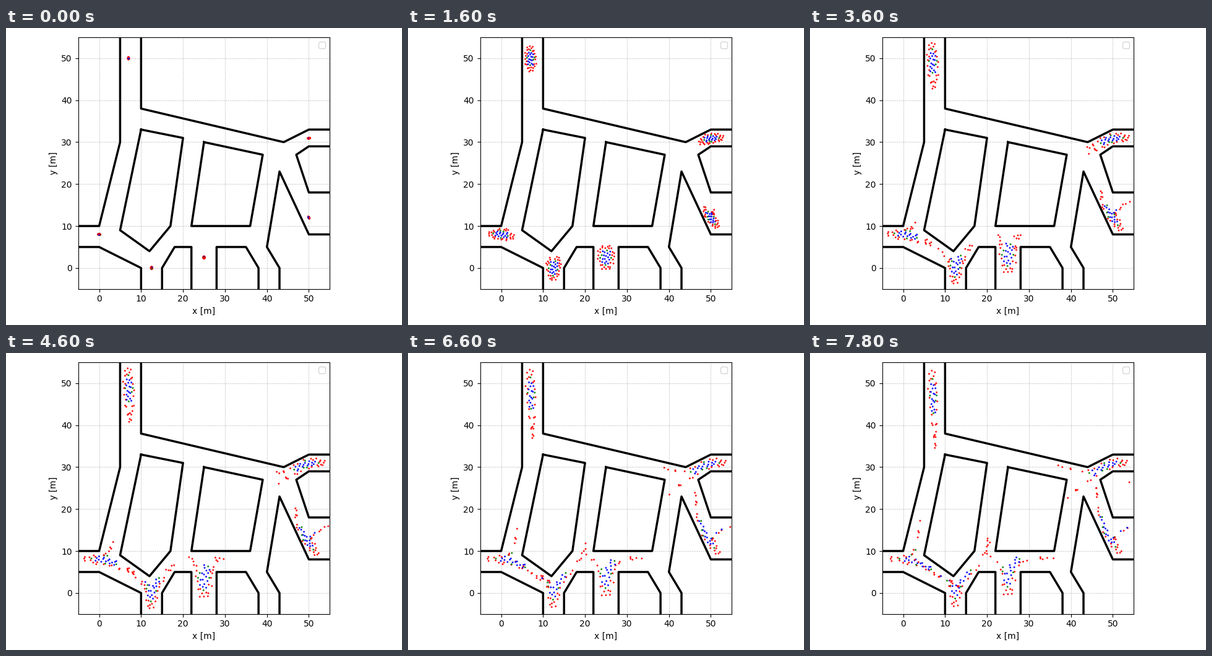
Recreate the animation shown at these times as a matplotlib script. Size 640 by 480 pixels, loop 8000 ms.

```python
import numpy as np
import matplotlib.pyplot as plt
from matplotlib.animation import FuncAnimation

W, H, DPI = 640, 480, 100
STEP_MS, STEPS = 200, 40
N, CALM = 48, 20     # people per crowd, those in its slow core
SPEED, REACH = 1.85, 3.0
RUN_UP = 7           # straight stretch behind each crowd's centre

WALLS = [
    [(5, 55), (5, 30), (0, 10), (-5, 10)],
    [(10, 55), (10, 38), (44, 30), (50, 33), (55, 33)],
    [(10, 33), (20, 31), (17, 10), (12, 4), (5, 9), (10, 33)],
    [(25, 30), (39, 27), (36, 10), (22, 10), (25, 30)],
    [(55, 29), (50, 29), (47, 27), (50, 18), (55, 18)],
    [(55, 8), (50, 8), (43, 23), (40, 5), (43, 0), (43, -5)],
    [(-5, 5), (0, 5), (10, 0), (10, -5)],
    [(15, -5), (15, 0), (18, 5), (22, 5), (22, -5)],
    [(28, -5), (28, 5), (35, 5), (38, 0), (38, -5)],
]

rng = np.random.default_rng(7)


def clearance(point):
    """Distance from a point to the nearest wall."""
    f = np.linspace(0, 1, 200)[:, None]
    return min(np.hypot(*(np.array(a) * (1 - f) + np.array(b) * f - point).T).min()
               for wall in WALLS for a, b in zip(wall, wall[1:]))


class Route:
    """Smoothed polyline; arc length zero is at the crowd's centre."""

    def __init__(self, center, points):
        pts = np.array([center, *points], float)
        first = pts[1] - pts[0]
        tail = pts[0] - RUN_UP * first / np.hypot(*first)
        self.pts = np.vstack([tail, pts])
        legs = np.hypot(*np.diff(self.pts, axis=0).T)
        self.arc = np.r_[0, np.cumsum(legs)] - RUN_UP

    def raw(self, s):
        return np.c_[np.interp(s, self.arc, self.pts[:, 0]),
                     np.interp(s, self.arc, self.pts[:, 1])]

    def place(self, s, side):
        s = np.clip(s, self.arc[0] + 1, self.arc[-1] - 1)
        ahead, behind = self.raw(s + 1), self.raw(s - 1)
        d = ahead - behind
        d /= np.hypot(*d.T)[:, None]
        normal = np.c_[-d[:, 1], d[:, 0]]
        return (ahead + behind + self.raw(s)) / 3 + normal * side[:, None]


class Crowd:
    """Bursts into an ellipse, then drains along one or two routes.

    hold: how strongly people behind the front lag
    share: part of the crowd that takes the left route
    """

    def __init__(self, center, hold, share, left, right):
        i = np.arange(N)
        r = np.sqrt((i + 0.5) / N) * rng.uniform(0.96, 1.04, N)
        angle = i * np.pi * (3 - 5 ** 0.5) + rng.normal(0, 0.06, N)
        u, v = r * np.cos(angle), r * np.sin(angle)
        self.along, self.side = u * REACH, v * 0.75 * clearance(center)
        lead = np.clip((u + 1) / 2, 0, 1)
        self.speed = 0.15 + SPEED * lead ** hold * np.where(i < CALM, 0.55, 1)
        self.back = 1.5 * (1 - lead) ** 2
        self.on_left = (v > np.quantile(v, 1 - share))[:, None]
        self.routes = Route(center, left), Route(center, right)

    def at(self, t):
        spread = 1.03 - 0.93 * np.exp(-t / 0.6)
        walk = max(0, t - 1.4)
        gone = self.speed * walk - self.back * (1 - np.exp(-walk))
        s = self.along * spread + gone
        side = self.side * spread / (1 + 0.02 * gone ** 2)
        left, right = (route.place(s, side) for route in self.routes)
        return np.where(self.on_left, left, right)


south = [(7.8, 32)]
CROWDS = [
    Crowd((7, 50), 1.2, 0.5, south, south),
    Crowd((0, 8), 1.1, 0.25,
          [(2.5, 8), (3.9, 11), (4.8, 23)],
          [(2.5, 7.8), (6, 6.2), (10, 3.8), (14, 1)]),
    Crowd((12.5, 0), 1.6, 0.4,
          [(12.5, 2.4), (9.5, 4.3), (2, 8.5)],
          [(12.7, 2), (15.4, 5), (18, 7), (21, 13)]),
    Crowd((25, 2.5), 1.4, 0.3,
          [(25, 6), (23, 8.7), (20.6, 9.2), (20.3, 14)],
          [(25, 5.5), (27.5, 8.5), (40, 8.4)]),
    Crowd((50, 31), 2.2, 0.5,
          [(49.4, 31), (46.5, 29.2), (43, 26.5), (38.5, 22)],
          [(49.4, 31), (46.5, 29.2), (43.5, 28.2), (36, 30.6)]),
    Crowd((50, 12), 1.4, 0.65,
          [(49.2, 13.2), (47.5, 17), (45.9, 26)],
          [(49.2, 13.2), (52, 15.5), (58, 17.5)]),
]

rank = np.arange(N)
kinds = np.where(rank < CALM, "blue", "red").astype("<U5")
kinds[CALM - 9:CALM:2] = "green"
colors = np.r_[np.tile(kinds, len(CROWDS)), ["red"]]
order = rng.permutation(len(colors))


def people(t):
    late = t - 7.2
    newcomer = [(54.9 - 1.6 * late, 27 - late)]
    return np.vstack([c.at(t) for c in CROWDS] + [newcomer])[order]


fig, ax = plt.subplots(figsize=(W / DPI, H / DPI), dpi=DPI)
ax.set_aspect("equal")
ax.set(xlim=(-5, 55), ylim=(-5, 55), xlabel="x [m]", ylabel="y [m]")
ax.set_xticks(range(0, 51, 10))
ax.set_yticks(range(0, 51, 10))
ax.grid(linestyle=":")
ax.legend(handles=[])
for wall in WALLS:
    ax.plot(*zip(*wall), color="black", lw=2.5)
dots = ax.scatter(*people(0).T, s=4.6, c=colors[order], alpha=0.9,
                  linewidths=0, zorder=3)
fig.tight_layout()


def update(k):
    dots.set_offsets(people(k * STEP_MS / 1000))
    return [dots]


anim = FuncAnimation(fig, update, frames=STEPS, interval=STEP_MS,
                     repeat=True, repeat_delay=0)
plt.show()
```
